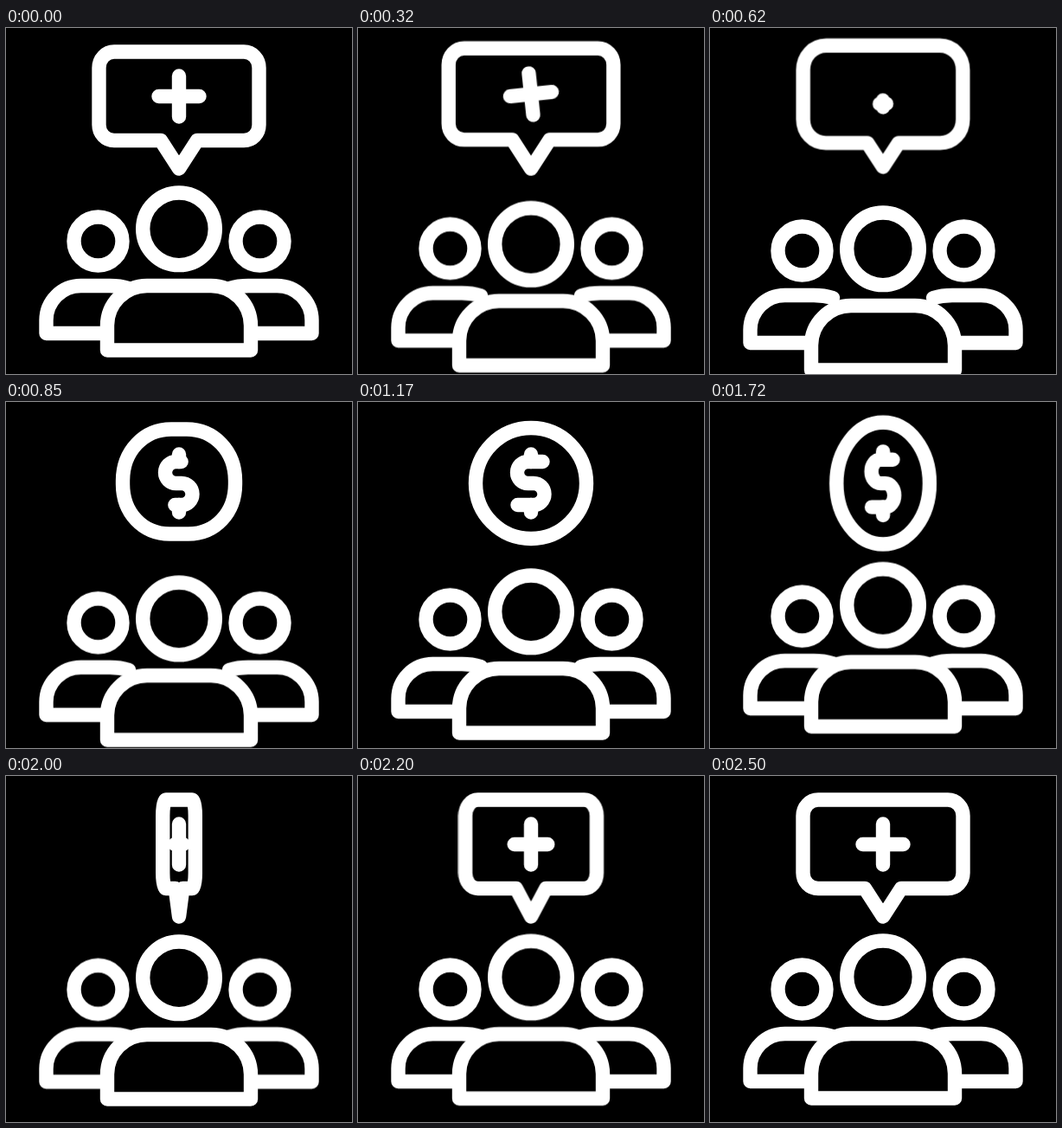
These frames come from a looping animation (400x400 px, 2520 ms). An HTML page without scripts:

```html
<!DOCTYPE html>
<html lang="en">
<head>
<meta charset="utf-8">
<title>Group and message</title>
<style>
  :root {
    --bubble: path("M200 162.5 L179 130 L125 130 C115 130 107.5 122 107.5 112 L107.5 46 C107.5 36 115 27.5 125 27.5 L275 27.5 C285 27.5 292.5 36 292.5 46 L292.5 112 C292.5 122 285 130 275 130 L221 130 Z");
    --soft: path("M200 152.5 L199 152.5 L189 152.5 C158 152.5 135 128 135 95 L135 91 C135 57 159 31.5 191 31.5 L209 31.5 C241 31.5 265 57 265 91 L265 95 C265 128 242 152.5 211 152.5 L201 152.5 Z");
    --coin: path("M200 158 L200 158 L200 158 C164.6 158 136 129.4 136 94 L136 94 C136 58.600 164.6 30 200 30 L200 30 C235.4 30 264 58.600 264 94 L264 94 C264 129.4 235.4 158 200 158 L200 158 Z");
  }
  html, body { margin: 0; width: 100%; height: 100%; overflow: hidden; background: #000; }
  svg { display: block; width: 100%; height: 100%; }
  svg g, svg path, svg circle { animation: 2520ms linear infinite; }
  .line {
    fill: none; stroke: #fff; stroke-width: 16.4;
    stroke-linecap: round; stroke-linejoin: round;
  }
  .sign path { vector-effect: non-scaling-stroke; }

  svg .front { --dip: 24px; animation-name: duck; }
  svg .side { --dip: 11.5px; animation-name: duck; }
  svg .sign { transform-origin: 200px 94px; animation-name: flip; }
  svg .outline { d: var(--bubble); animation-name: morph; }
  svg .plus { transform-origin: 200px 79px; animation-name: plus; }
  svg .dollar { animation-name: dollar; }
  svg .curve { animation-name: draw; }

  @keyframes duck {
    0% { transform: none; animation-timing-function: ease-in-out; }
    19.84% { transform: translateY(var(--dip)); animation-timing-function: ease; }
    99.2%, 100% { transform: none; }
  }
  @keyframes flip {
    0% { transform: translateY(0) scale(1, 1); animation-timing-function: ease-in; }
    12.7% { transform: translateY(-2px) scale(1.03, 1.03); animation-timing-function: ease-out; }
    20.6% { transform: translateY(-5px) scale(1.075, 1.075); animation-timing-function: ease-in-out; }
    33.73%, 46.43% { transform: translateY(0) scale(1, 1); animation-timing-function: ease-in-out; }
    55.56% { transform: translateY(0) scale(1.14, 1.14); animation-timing-function: ease-in-out; }
    64.29% { transform: translateY(0) scale(1.06, 1.09); animation-timing-function: ease-in; }
    68.25% { transform: translateY(0) scale(.845, 1.1); }
    77.18% { transform: translateY(0) scale(.01, 1); }
    79.37% { transform: translateY(0) scale(.2, 1); animation-timing-function: cubic-bezier(.25, .45, .5, 1); }
    95.24%, 100% { transform: translateY(0) scale(1, 1); }
  }
  @keyframes morph {
    0%, 20.6% { d: var(--bubble); animation-timing-function: ease-in-out; }
    33.73% { d: var(--soft); animation-timing-function: ease-out; }
    41%, 77.18% { d: var(--coin); }
    77.19%, 100% { d: var(--bubble); }
  }
  @keyframes plus {
    0% { transform: none; visibility: visible; }
    12.7% { transform: rotate(-6deg) scale(1); }
    17% { transform: rotate(-9deg) scale(1); animation-timing-function: ease-in; }
    25.4% { transform: translateY(15px) rotate(0deg) scale(.01); visibility: visible; }
    25.41%, 77.18% { transform: none; visibility: hidden; }
    77.19%, 100% { transform: none; visibility: visible; }
  }
  @keyframes dollar {
    0%, 25.4% { visibility: hidden; }
    25.41%, 77.18% { visibility: visible; }
    77.19%, 100% { visibility: hidden; }
  }
  @keyframes draw {
    0%, 25.4% { stroke-dasharray: 0 200; stroke-dashoffset: -60; animation-timing-function: ease-out; }
    33.73% { stroke-dasharray: 98 200; stroke-dashoffset: -11; animation-timing-function: ease-out; }
    39% { stroke-dasharray: 122 200; stroke-dashoffset: 0; }
    39.1%, 100% { stroke-dasharray: 300 200; stroke-dashoffset: 0; }
  }
</style>
</head>
<body>
<svg viewBox="0 0 400 400">
  <defs>
    <g id="person">
      <circle cx="106.5" cy="246.5" r="28"/>
      <path d="M113 353 H46.5 V338 A40 40 0 0 1 86.5 298 H120 Q132 298 142 301"/>
    </g>
  </defs>
  <g class="line">
    <g class="side">
      <use href="#person"/>
      <use href="#person" transform="matrix(-1 0 0 1 400 0)"/>
    </g>
    <g class="front">
      <circle cx="200" cy="232.3" r="41.8"/>
      <path d="M117 372.5 V344 A46 46 0 0 1 163 298 H237 A46 46 0 0 1 283 344 V372.5 Z"/>
    </g>
    <g class="sign">
      <path class="outline"/>
      <path class="plus" d="M176.5 79 H223.5 M200 55.5 V102.5"/>
      <g class="dollar">
        <path d="M200 60.5 V69 M200 119 V127.5"/>
        <path class="curve" d="M213.5 69 H196.5 A12.5 12.5 0 0 0 196.5 94 H203 A12.5 12.5 0 0 1 203 119 H184.5"/>
      </g>
    </g>
  </g>
</svg>
</body>
</html>
```
